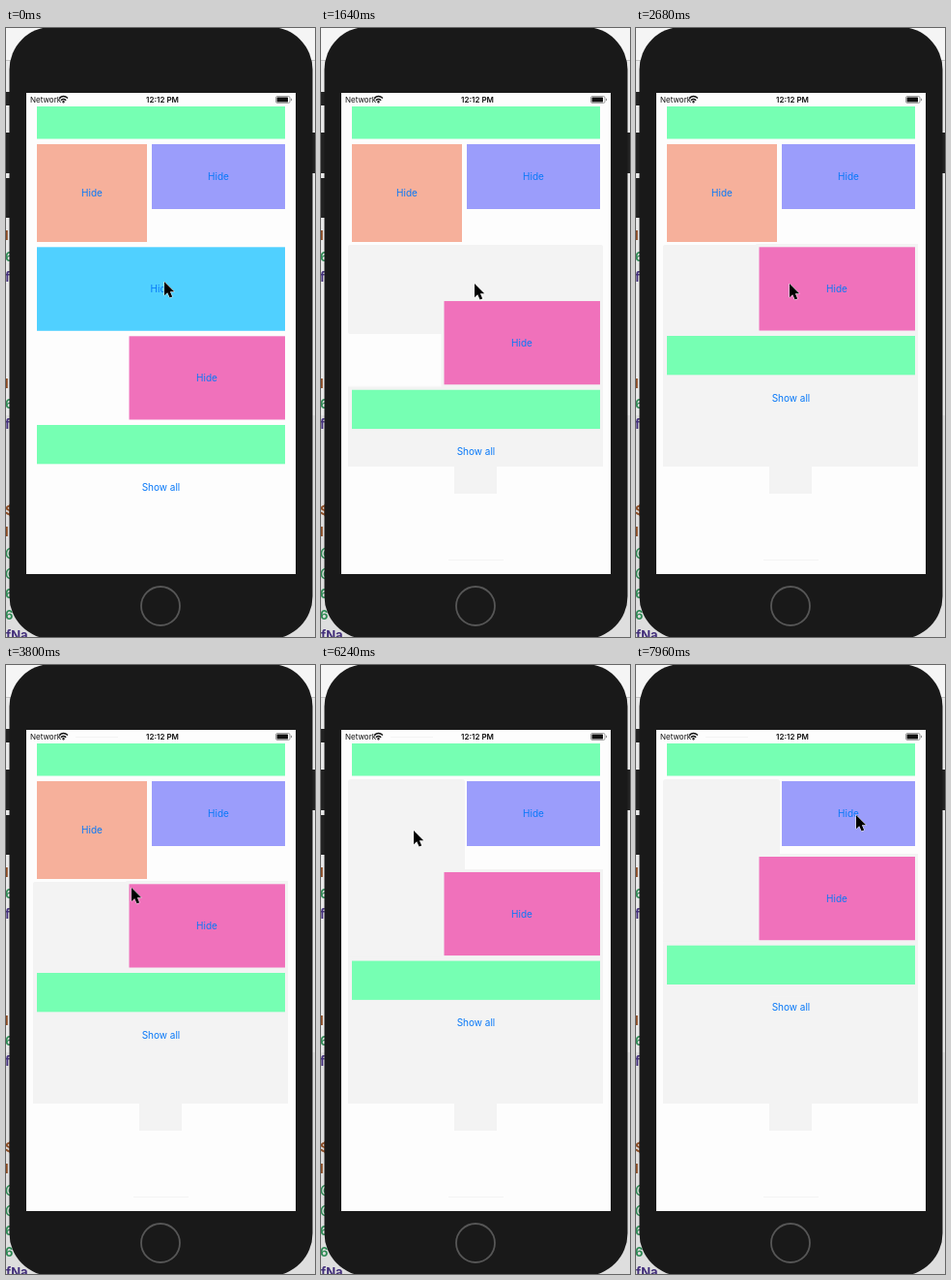
Write an HTML page that moves like this. It is 320x629 px and loops after 8000 ms.

```html
<!DOCTYPE html>
<html lang="en">
<head>
<meta charset="utf-8">
<title>Stack view hiding</title>
<style>
  html, body { margin: 0; width: 100%; height: 100%; overflow: hidden; background: #e9e9e9; }
  svg { display: block; width: 320px; height: 629px; }
  text { font-family: Inter, Roboto, sans-serif; }
  .label { font-size: 10px; fill: #0878f8; text-anchor: middle; }
  .status { font-size: 8px; fill: #111; }
  .code { font: bold 13px "DejaVu Sans Mono", monospace; }
  .trail { fill: #f3f3f3; }

  .shift, .blue, .blue-slot, .orange, .orange-slot, .trails, .line-a, .line-b, .cursor {
    animation: 8s linear infinite both;
  }
  .shift { animation-name: shift; }
  .blue { animation-name: fade-blue; }
  .orange { animation-name: fade-orange; }
  .blue-slot { animation-name: show-blue-slot; }
  .orange-slot { animation-name: show-orange-slot; }
  .trails { animation-name: show-trails; }
  .line-a { animation-name: show-line-a; }
  .line-b { animation-name: show-line-b; }
  .cursor { animation-name: point; }

  /* The lower rows close the gap after each block has faded. */
  @keyframes shift {
    0% { transform: translateY(0); }
    13.9% { transform: translateY(0); animation-timing-function: ease-in-out; }
    29% { transform: translateY(-92px); }
    71% { transform: translateY(-92px); animation-timing-function: ease-in-out; }
    86.1%, 100% { transform: translateY(-120.3px); }
  }
  @keyframes fade-blue { 0%, 8.4% { opacity: 1; } 13.9%, 100% { opacity: 0; } }
  @keyframes fade-orange { 0%, 65.5% { opacity: 1; } 71%, 100% { opacity: 0; } }
  @keyframes show-blue-slot { 0%, 8.4% { opacity: 0; } 8.41%, 100% { opacity: 1; } }
  @keyframes show-orange-slot { 0%, 65.5% { opacity: 0; } 65.51%, 100% { opacity: 1; } }
  @keyframes show-trails { 0%, 13.9% { opacity: 0; } 13.91%, 100% { opacity: 1; } }
  @keyframes show-line-a { 0%, 20% { opacity: 0; } 20.01%, 100% { opacity: 1; } }
  @keyframes show-line-b { 0%, 40% { opacity: 0; } 40.01%, 100% { opacity: 1; } }
  @keyframes point {
    0%, 0.4% { transform: translate(164px, 262px); animation-timing-function: ease-out; }
    4.5%, 41.5% { transform: translate(159px, 264px); animation-timing-function: ease-in; }
    47.5% { transform: translate(130px, 230px); animation-timing-function: ease-out; }
    55.5%, 64.5% { transform: translate(95.5px, 171px); }
    66%, 87.5% { transform: translate(96px, 171px); animation-timing-function: ease-in; }
    92% { transform: translate(152px, 170px); }
    94.5% { transform: translate(212px, 147px); animation-timing-function: ease-out; }
    97%, 100% { transform: translate(228px, 155px); }
  }
</style>
</head>
<body>
<svg viewBox="0 0 320 629">
  <defs>
    <clipPath id="rows-clip"><path d="M0 0H320V453H0z"/></clipPath>
    <clipPath id="button-clip"><path d="M0 0H320V481H0z"/></clipPath>
  </defs>

  <!-- Editor behind the phone -->
  <rect width="320" height="629" fill="#e9e9e9"/>
  <path d="M0 0H320V33H0z" fill="#f5f5f5"/>
  <path d="M0 33.500H320" stroke="#c4c4c4"/>
  <path d="M0 400H320V629H0z" fill="#dedede"/>
  <g class="code">
    <g fill="#8a4a22">
      <text x="-1" y="219">I</text><text x="-1" y="372">I</text>
      <text x="-1" y="503">$</text><text x="-1" y="525">I</text>
    </g>
    <g fill="#2f8a55">
      <text x="-1" y="241">6</text><text x="-1" y="393">6</text>
      <text x="-1" y="546">@</text><text x="-1" y="567">@</text>
      <text x="-1" y="589">6</text><text x="-1" y="611">6</text>
    </g>
    <g fill="#44307c">
      <text x="-1" y="262">f</text><text x="-1" y="414">f</text><text x="0" y="632">fNa</text>
    </g>
  </g>

  <!-- Phone -->
  <path d="M0 66H5V80H0zM0 108H5V150H0zM0 155H5V196H0zM315 108H320V150H315z" fill="#222"/>
  <rect x="3.500" y="-1" width="314" height="632" rx="44" fill="#191919"/>
  <circle cx="160" cy="597" r="20" fill="none" stroke="#565656" stroke-width="1.800"/>
  <rect x="21" y="67" width="279" height="497" fill="#fdfdfd"/>

  <!-- Status bar -->
  <text class="status" x="25" y="77" font-size="8">Network</text>
  <text class="status" x="162" y="77" text-anchor="middle" font-weight="600">12:12 PM</text>
  <g fill="none" stroke="#111" stroke-width="1.400">
    <path d="M55 72.600Q59.500 68.600 64 72.600M56.800 74.700Q59.500 72.300 62.200 74.700"/>
    <circle cx="59.500" cy="76.300" r=".5"/>
  </g>
  <rect x="279.500" y="70.500" width="14.500" height="7" rx="1.500" fill="none" stroke="#777" stroke-width=".7"/>
  <rect x="280.500" y="71.500" width="11.500" height="5" rx=".6" fill="#111"/>
  <path d="M295 72.500Q297 74 295 75.500z" fill="#777"/>

  <!-- Pale areas left by hidden and moving views -->
  <rect class="trail blue-slot" x="28" y="224" width="264" height="92" rx="2"/>
  <rect class="trail orange-slot" x="28" y="118" width="121" height="108" rx="3"/>
  <g class="trails">
    <g clip-path="url(#rows-clip)">
      <g class="shift trail">
        <rect x="124.500" y="315" width="167.500" height="400"/>
        <rect x="28" y="406.500" width="264" height="400"/>
      </g>
    </g>
    <g clip-path="url(#button-clip)">
      <rect class="shift trail" x="138" y="463" width="44" height="400"/>
    </g>
  </g>
  <path class="line-a" d="M132 549.500H189" stroke="#f4f4f4"/>
  <path class="line-b" d="M72 74.500H116" stroke="#f4f4f4"/>

  <!-- Stack view -->
  <rect x="32" y="81" width="257" height="33.500" fill="#76ffb3"/>
  <g class="orange">
    <rect x="32" y="120" width="114" height="101" fill="#f6b09b"/>
    <text class="label" x="89" y="174">Hide</text>
  </g>
  <rect x="151" y="120" width="138" height="67" fill="#9b9dfb"/>
  <text class="label" x="220" y="157">Hide</text>
  <g class="blue">
    <rect x="32" y="226.300" width="257" height="86.500" fill="#50d0ff"/>
    <text class="label" x="160.500" y="273">Hide</text>
  </g>
  <g class="shift">
    <rect x="127.500" y="318.300" width="161.500" height="86.200" fill="#f071bb"/>
    <text class="label" x="208" y="365">Hide</text>
    <rect x="32" y="410" width="257" height="40.300" fill="#76ffb3"/>
    <text class="label" x="160.500" y="477.500">Show all</text>
  </g>

  <path class="cursor" d="M0 0V14.200L3.200 11.200L5.600 16.600L8.200 15.500L5.900 10.200H10.200z"
        fill="#000" stroke="#fff" stroke-width="1" stroke-linejoin="round" paint-order="stroke"/>
</svg>
</body>
</html>
```
